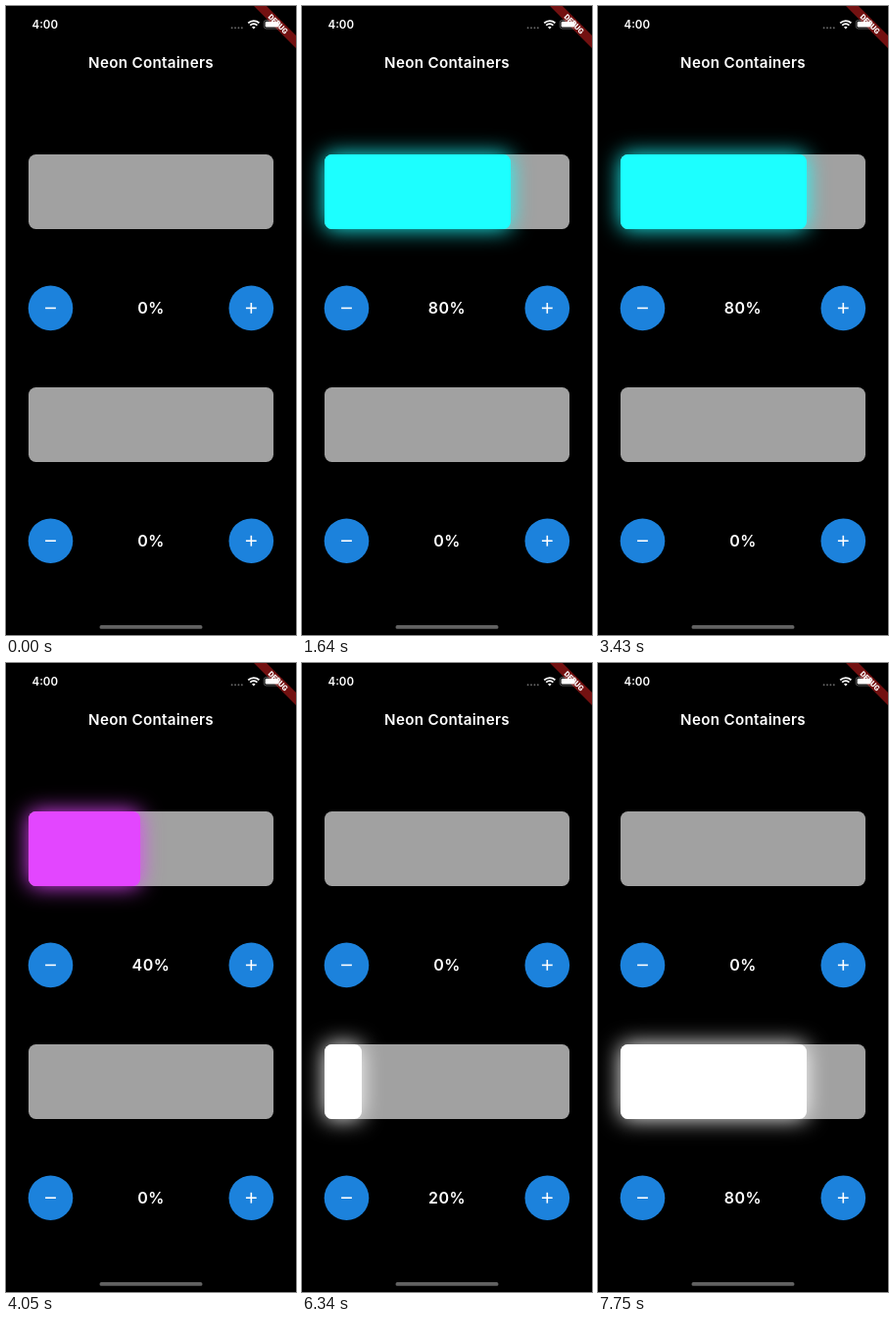
An HTML page that plays this animation: 296 by 640 pixels, repeating every 8000 ms.

```html
<!DOCTYPE html>
<html lang="en">
<head>
<meta charset="utf-8">
<title>Neon Containers</title>
<style>
  html, body { margin: 0; width: 100%; height: 100%; overflow: hidden; background: #000; }
  body { position: relative; }
  svg { position: absolute; left: 0; top: 0; }
  text { font: 600 16px Inter, sans-serif; fill: #fff; }
  .title { font-size: 15.2px; letter-spacing: .3px; }
  .clock { font-size: 11.5px; }
  .debug { font: 900 7.74px Roboto, sans-serif; }
  .percent { letter-spacing: .5px; }
  .mid { text-anchor: middle; }
  .track { position: absolute; left: 23px; width: 250px; height: 76px; border-radius: 7.6px; background: #a1a1a1; }
  .fill { height: 100%; border-radius: 7.6px; }
</style>
</head>
<body>
<div class="track" style="top:151px"><div class="fill"></div></div>
<div class="track" style="top:388px"><div class="fill"></div></div>
<svg width="296" height="640" viewBox="0 0 296 640">
  <defs>
    <g id="minus">
      <circle r="22.8" fill="#1c82dc"/>
      <path d="M-5.4 0H5.4" stroke="#fff" stroke-width="1.6"/>
    </g>
    <g id="plus">
      <use href="#minus"/>
      <path d="M0-5.4V5.4" stroke="#fff" stroke-width="1.6"/>
    </g>
    <g id="buttons">
      <use href="#minus" x="45.5"/>
      <use href="#plus" x="250.3"/>
    </g>
  </defs>

  <text class="title mid" x="148" y="62.5">Neon Containers</text>

  <use href="#buttons" y="307.4"/>
  <use href="#buttons" y="544.2"/>
  <text class="percent mid" x="148" y="313">0%</text>
  <text class="percent mid" x="148" y="549.8">0%</text>

  <g transform="translate(296) rotate(45)">
    <rect x="-31" y="21.25" width="62" height="9.1" fill="#b71c1c" fill-opacity=".63"/>
    <text class="debug mid" y="28.6">DEBUG</text>
  </g>

  <text class="clock" x="26.5" y="23">4:00</text>
  <path d="M230.6 22.2h11" stroke="#666" stroke-width="1.9" stroke-linecap="round" stroke-dasharray="0 3.4"/>
  <g fill="none" stroke="#fff" stroke-width="1.8">
    <path d="M247.2 17.4a8 8 0 0 1 11.2 0M249.2 19.7a5.2 5.2 0 0 1 7.2 0"/>
    <path d="M252.8 23.4l-1.8-1.8a2.6 2.6 0 0 1 3.6 0z" fill="#fff" stroke="none"/>
  </g>
  <rect x="263.2" y="14.4" width="16.8" height="8.6" rx="2.5" fill="none" stroke="#fff" stroke-opacity=".4" stroke-width=".8"/>
  <rect x="264.6" y="15.8" width="14" height="5.8" rx="1.3" fill="#fff"/>
  <path d="M281.3 17.2q1.4 1.5 0 3z" fill="#fff" fill-opacity=".45"/>

  <rect x="95.5" y="630" width="105" height="3.8" rx="1.9" fill="#626262"/>
</svg>
<script>
const LOOP = 8000;
const widths = [0, 38, 114, 152, 190, 250];
const neon = ['', '#ff5252', '#e346ff', '#ffee42', '#1cffff', '#74f2b7'];
const white = Array(6).fill('#fff');

// Each step is [start time, level]; one level is 20%.
const meters = [
  { colors: neon, steps: [[0, 0], [500, 2], [1000, 3], [1640, 4], [2130, 5], [3430, 4], [3730, 3], [4050, 2], [4420, 1], [4920, 0]] },
  { colors: white, steps: [[0, 0], [6340, 1], [6960, 2], [7350, 3], [7750, 4]] }
];
const fills = document.querySelectorAll('.fill');
const labels = document.querySelectorAll('.percent');

function show(i, level) {
  const color = meters[i].colors[level];
  const style = fills[i].style;
  style.width = widths[level] + 'px';
  style.background = color;
  style.boxShadow = level ? `0 0 22px ${color}` : 'none';
  labels[i].textContent = level * 20 + '%';
}

function draw() {
  const t = performance.now() % LOOP;
  meters.forEach((meter, i) => {
    const level = meter.steps.filter(([start]) => start <= t).pop()[1];
    if (level !== meter.level) show(i, meter.level = level);
  });
  requestAnimationFrame(draw);
}
draw();
</script>
</body>
</html>
```
